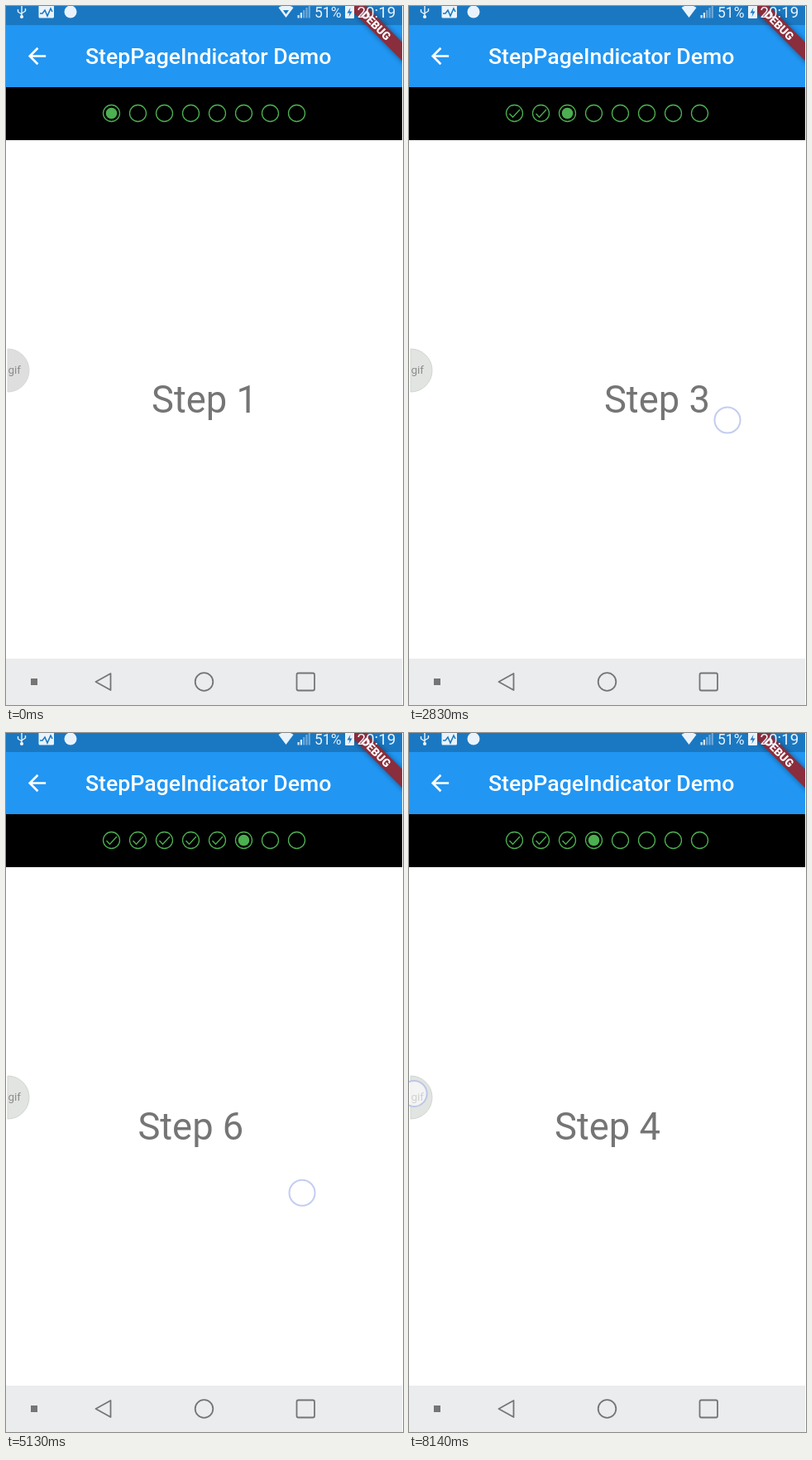
Animation, 480 px wide and 844 px high, one loop 8.24 s. Source, as an HTML page:

```html
<!DOCTYPE html>
<html lang="en">
<head>
<meta charset="utf-8">
<title>StepPageIndicator Demo</title>
<style>
  html, body { margin: 0; width: 100%; height: 100%; overflow: hidden; background: #fff; }
  svg { display: block; width: 100vw; height: 100vh; }
  text { font-family: Roboto, sans-serif; }
  #ribbon rect { filter: drop-shadow(0 0 3px rgba(0, 0, 0, .45)); }
</style>
</head>
<body>
<svg viewBox="0 0 480 844" preserveAspectRatio="xMinYMin meet">
  <rect width="480" height="844" fill="#fff"/>
  <g id="pages" fill="#757575" font-size="45.33" text-anchor="middle"></g>

  <rect y="98" width="480" height="64" fill="#000"/>
  <g id="dots" fill="none" stroke="#4caf50" stroke-width="1.3"></g>

  <!-- app bar -->
  <rect y="23" width="480" height="75" fill="#2196f3"/>
  <path transform="translate(21.5 44.5) scale(1.333)" fill="#fff"
    d="M20 11H7.83l5.59-5.59L12 4l-8 8 8 8 1.41-1.41L7.83 13H20z"/>
  <text x="96" y="70" fill="#fff" font-size="26.67" font-weight="500">StepPageIndicator Demo</text>

  <!-- status bar -->
  <rect width="480" height="23" fill="#1a78c2"/>
  <g id="ribbon" transform="translate(447.5 23.5) rotate(45)">
    <rect x="-60" y="-8" width="120" height="16" fill="#8a2d3c"/>
    <text y="4.8" fill="#fff" font-size="13.6" font-weight="900" text-anchor="middle">DEBUG</text>
  </g>
  <g fill="none" stroke="#eaf3fb" stroke-width="1.4">
    <path d="M19 0V13M14.5 4V7L19 10M23.5 3V6L19 9"/>
    <circle cx="19" cy="13" r="1.4" fill="#eaf3fb"/>
  </g>
  <rect x="39.5" y="-2" width="18.5" height="16.5" rx="1.5" fill="#eaf3fb"/>
  <path d="M41 9H44L47 5L50 12L54 3L56 7" fill="none" stroke="#1a78c2" stroke-width="1.6"/>
  <circle cx="78" cy="7" r="7.5" fill="#eaf3fb"/>
  <path d="M329.5 2Q338.5 -4 347.5 2L338.5 14Z" fill="#eaf3fb"/>
  <path id="traffic" d="M335 5H342L338.5 10Z" fill="#1a78c2"/>
  <g id="bars" fill="#eaf3fb"></g>
  <g fill="#eaf3fb">
    <text x="373" y="14" font-size="17.5">51%</text>
    <text x="424.5" y="14" font-size="18.8">20:19</text>
    <rect x="410" y="-2" width="11" height="17" rx="1"/>
  </g>
  <path d="M416.5 2L412.5 8.5H415.5L414.5 13L418.5 6.5H415.5Z" fill="#1a78c2"/>

  <!-- navigation bar -->
  <rect y="788" width="480" height="56" fill="#ebecee"/>
  <rect x="30" y="812" width="8" height="8" fill="#757575"/>
  <g fill="none" stroke="#757575" stroke-width="1.8" stroke-linejoin="round">
    <path d="M108.5 816L126.5 806V826Z"/>
    <circle cx="239.5" cy="816" r="10.8"/>
    <rect x="351.5" y="805.5" width="21.5" height="21" rx="2"/>
  </g>

  <!-- floating button -->
  <path id="bubble" d="M2 414A26 26 0 0 1 2 466Z" stroke-width="1"/>
  <text x="2.5" y="444" fill="#8c8c8c" font-size="13.5">gif</text>

  <circle id="touch" r="15.5" fill="#fff" fill-opacity=".6" stroke="#aab8ea" stroke-opacity=".7" stroke-width="2"/>
  <rect x="479" width="1" height="844" fill="#fff"/>
</svg>
<script>
const LOOP = 8240, PAGE = 480, STEPS = 8, SLOP = 24;
const FAST = -22.03, SLOW = -9.07; // roots of the page spring, per second
const TAP_UP = 6700;

// finger down, up, then start and end points
const swipes = [
  [1130, 1740, 298, 530, 90, 581],
  [2440, 2660, 390, 545, 150, 589],
  [2830, 3062, 385, 500, 160, 517],
  [4040, 4270, 390, 548, 150, 606],
  [4420, 4650, 395, 545, 155, 606],
  [5020, 5260, 413, 539, 156, 615],
  [5370, 5580, 390, 540, 150, 587]
];
const taps = [
  [6490, TAP_UP, 223, 121, 223, 121],
  [7840, LOOP, 5, 432, 7, 438]
];

const $ = id => document.getElementById(id);
const add = (parent, tag, attrs) => {
  const el = document.createElementNS("http://www.w3.org/2000/svg", tag);
  for (const k in attrs) el.setAttribute(k, attrs[k]);
  return parent.appendChild(el);
};
const show = (el, on) => el.setAttribute("visibility", on ? "visible" : "hidden");

const dots = [];
for (let i = 0; i < STEPS; i++) {
  add($("pages"), "text", { x: 240 + i * PAGE, y: 491 }).textContent = "Step " + (i + 1);
  const x = 127.5 + 32 * i;
  add($("dots"), "circle", { cx: x, cy: 129.5, r: 10 });
  dots.push({
    fill: add($("dots"), "circle", { cx: x, cy: 129.5, r: 6.8, fill: "#4caf50", stroke: "none" }),
    check: add($("dots"), "path", { d: `M${x - 6} 130l4 4.3l8.5 -9.3` })
  });
}
for (let i = 0; i < 5; i++) {
  add($("bars"), "rect", { x: 352.5 + 3.3 * i, y: 11 - 3 * i, width: 2.2, height: 3.5 + 3 * i, opacity: i < 2 ? .9 : .4 });
}

function finger([down, up, x0, y0, x1, y1], t) {
  const u = Math.min(1, (t - down) / (up - down)), p = u * u;
  return { x: x0 + (x1 - x0) * p, y: y0 + (y1 - y0) * p };
}

function spring(dist, speed, s) {
  const a = (speed - FAST * dist) / (SLOW - FAST);
  return a * Math.exp(SLOW * s) + (dist - a) * Math.exp(FAST * s);
}

function scroll(t) {
  if (t >= TAP_UP) return 3 * PAGE;
  let pos = 0;
  swipes.forEach((sw, i) => {
    const [down, up, x0, , x1] = sw;
    if (t < down) return;
    pos += Math.max(0, x0 - finger(sw, t).x - SLOP);
    if (t < up) return;
    const next = swipes[i + 1];
    const end = next ? Math.min(t, next[0]) : t;
    const goal = (i + 1) * PAGE;
    const speed = -2000 * (x0 - x1) / (up - down);
    pos = goal - spring(goal - pos, speed, (end - up) / 1000);
  });
  return pos;
}

function draw(t) {
  const pos = scroll(t), page = Math.round(pos / PAGE);
  $("pages").setAttribute("transform", `translate(${-pos} 0)`);
  dots.forEach((d, i) => {
    show(d.fill, i === page);
    show(d.check, i < page);
  });

  const press = [...swipes, ...taps].find(p => t >= p[0] && t < p[1]);
  show($("touch"), press);
  if (press) {
    const { x, y } = finger(press, t);
    $("touch").setAttribute("cx", x);
    $("touch").setAttribute("cy", y);
  }

  show($("traffic"), t < 580 || (t >= 5900 && t < 6970));
  $("bubble").setAttribute("fill", t < 120 ? "#dedede" : "#e2e4e1");
  $("bubble").setAttribute("stroke", t < 120 ? "#d8d8d8" : "#d0d6d0");
}

const start = performance.now();
function tick() {
  draw((performance.now() - start) % LOOP);
  requestAnimationFrame(tick);
}
tick();
</script>
</body>
</html>
```
